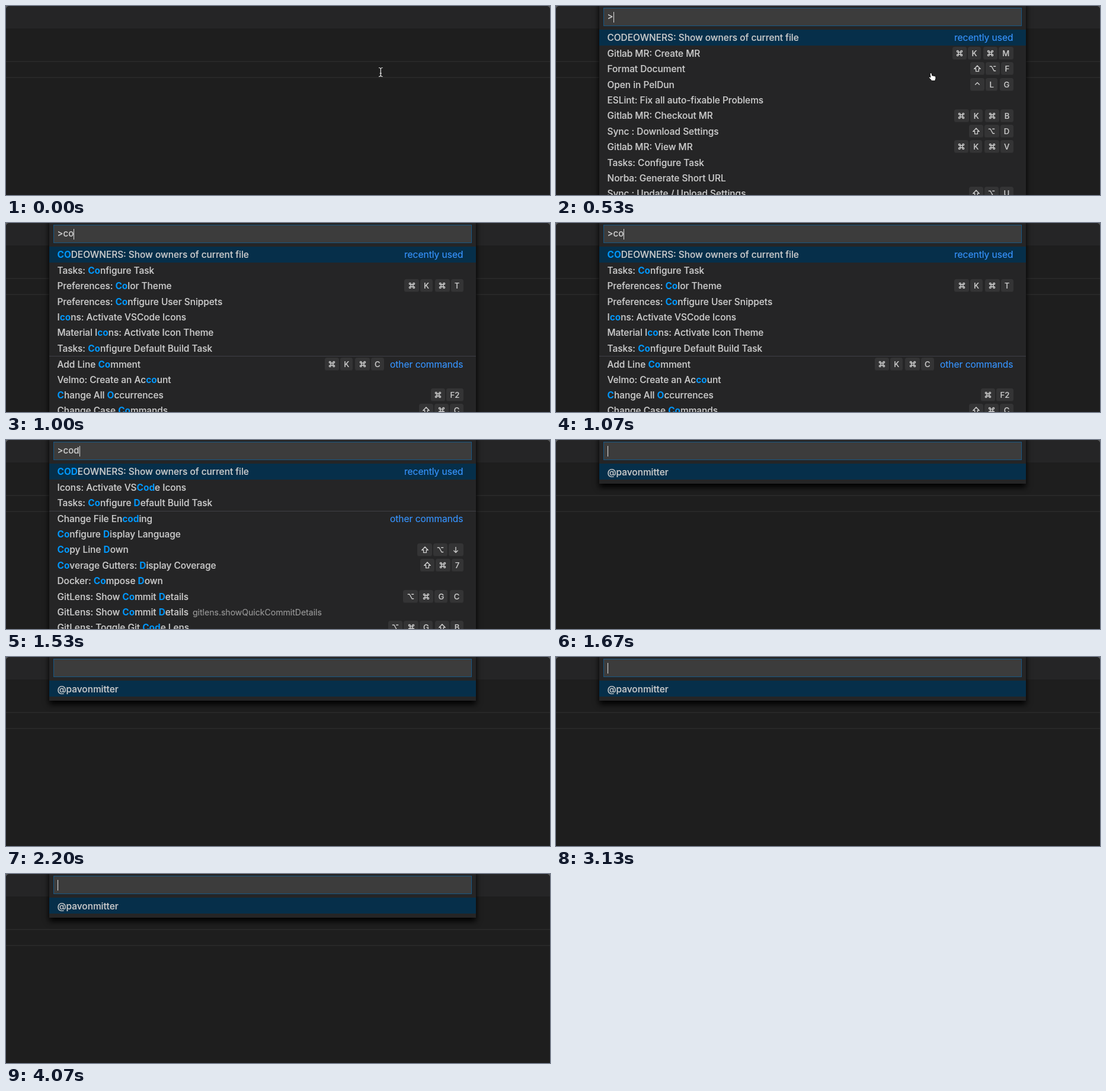
These frames come from a looping animation (918 by 320 pixels, 4140 ms). An HTML page:

```html
<!DOCTYPE html>
<html lang="en">
<head>
<meta charset="utf-8">
<title>Command palette</title>
<style>
  html, body { margin: 0; width: 100%; height: 100%; overflow: hidden; background: #5a5a5a; }
  #stage {
    position: relative; width: 918px; height: 320px; overflow: hidden;
    background: #1e1e1e; border-radius: 6px 6px 0 0;
    font: 500 15.4px/26.4px Inter, "Open Sans", sans-serif; color: #ccc;
    -webkit-text-stroke: .15px;
  }
  .bar { position: absolute; inset: 0 0 auto; height: 38px; background: #252526; }
  .line { position: absolute; left: 0; right: 0; height: 2px; background: #282828; }
  .panel {
    position: absolute; left: 73px; top: -10px; width: 720px; height: 350px;
    background: #252526; box-shadow: 0 6px 9.6px #000;
  }
  .panel.small { height: 84px; }
  .input {
    position: absolute; left: 7px; top: 13px; width: 706px; height: 31px; box-sizing: border-box;
    display: flex; align-items: center; padding-left: 5.5px; font-size: 15px;
    background: #3c3c3c; border: 1px solid #175885;
  }
  .caret { width: 1px; height: 18px; background: #e0e0e0; }
  .list { position: absolute; left: 0; right: 0; top: 50.4px; }
  .row {
    display: flex; align-items: center; height: 26.4px; box-sizing: border-box;
    padding: 0 21.5px 0 13.5px; white-space: pre;
  }
  .row:first-child { background: #062f4a; }
  .small .row { padding-top: 1px; }
  .row.split { padding-top: 1px; box-shadow: inset 0 1px #3f3f46; }
  .label, .desc, .group { position: relative; top: 1px; }
  .row b { color: #0097fb; font-weight: 700; -webkit-text-stroke: 0; }
  .desc { margin-left: 7px; font-size: 14.05px; font-weight: 400; color: #979797; }
  .keys { display: flex; gap: 2px; margin-left: auto; }
  .key {
    display: flex; align-items: center; height: 22px; padding: 0 6.2px;
    border-radius: 3.5px; background: #343435; box-shadow: inset 0 -1px #2c2c2d;
    font-size: 13.2px; line-height: 22px;
  }
  .chord { margin-left: 2px; }
  .key svg { width: 12px; height: 12px; fill: none; stroke: #ccc; stroke-width: 1.4; }
  .group { margin-left: 10px; font-size: 15.5px; font-weight: 400; color: #3794ff; }
  .mouse { position: absolute; left: 0; top: 0; }
</style>
</head>
<body>
<div id="stage">
  <div class="bar"></div>
  <div class="line" style="top:93px"></div>
  <div class="line" style="top:120px"></div>
</div>
<script>
const LOOP = 4140;
const stage = document.getElementById('stage');

const ICONS = {
  '⌘': 'M4.2 4.2V2.8A1.4 1.4 0 1 0 2.8 4.2H9.2A1.4 1.4 0 1 0 7.8 2.8V9.2A1.4 1.4 0 1 0 9.2 7.8H2.8A1.4 1.4 0 1 0 4.2 9.2Z',
  '⇧': 'M6 1 11 6.3H8.4V10.6H3.6V6.3H1Z',
  '⌥': 'M.8 2.2H4L8.2 9.8H11.2M7.2 2.2H11.2',
  '⌃': 'M2.2 6.5 6 2.8 9.8 6.5',
  '↓': 'M6 1V10.5M2.4 7 6 10.6 9.6 7'
};

// Row: label with *matches*, keys ("|" starts a chord), group, description
const LISTS = {
  all: [
    ['CODEOWNERS: Show owners of current file', '', 'recently used'],
    ['Gitlab MR: Create MR', '⌘ K|⌘ M'],
    ['Format Document', '⇧ ⌥ F'],
    ['Open in PelDun', '⌃ L|G'],
    ['ESLint: Fix all auto-fixable Problems'],
    ['Gitlab MR: Checkout MR', '⌘ K|⌘ B'],
    ['Sync : Download Settings', '⇧ ⌥ D'],
    ['Gitlab MR: View MR', '⌘ K|⌘ V'],
    ['Tasks: Configure Task'],
    ['Norba: Generate Short URL'],
    ['Sync : Update / Upload Settings', '⇧ ⌥ U']
  ],
  co: [
    ['*CO*DEOWNERS: Show owners of current file', '', 'recently used'],
    ['Tasks: *Co*nfigure Task'],
    ['Preferences: *Co*lor Theme', '⌘ K|⌘ T'],
    ['Preferences: *Co*nfigure User Snippets'],
    ['I*co*ns: Activate VSCode Icons'],
    ['Material I*co*ns: Activate Icon Theme'],
    ['Tasks: *Co*nfigure Default Build Task'],
    ['Add Line *Co*mment', '⌘ K|⌘ C', 'other commands'],
    ['Velmo: Create an Ac*co*unt'],
    ['*C*hange All *O*ccurrences', '⌘ F2'],
    ['Change Case *Co*mmands', '⇧ ⌘ C']
  ],
  cod: [
    ['*COD*EOWNERS: Show owners of current file', '', 'recently used'],
    ['Icons: Activate VS*Cod*e Icons'],
    ['Tasks: *Co*nfigure *D*efault Build Task'],
    ['Change File En*cod*ing', '', 'other commands'],
    ['*Co*nfigure *D*isplay Language'],
    ['*Co*py Line *D*own', '⇧ ⌥ ↓'],
    ['*Co*verage Gutters: *D*isplay Coverage', '⇧ ⌘ 7'],
    ['Docker: *Co*mpose *D*own'],
    ['GitLens: Show *Co*mmit *D*etails', '⌥ ⌘ G|C'],
    ['GitLens: Show *Co*mmit *D*etails', '', '', 'gitlens.showQuickCommitDetails'],
    ['GitLens: Toggle Git *Cod*e Lens', '⌥ ⌘ G|⇧ B']
  ],
  owner: [['@pavonmitter']]
};

const keyHtml = (key, chord) => `<span class="key${chord ? ' chord' : ''}">${
  ICONS[key] ? `<svg viewBox="0 0 12 12"><path d="${ICONS[key]}"/></svg>` : key}</span>`;

const keysHtml = keys => keys.split('|').map((part, p) =>
  part.split(' ').filter(Boolean).map((key, k) => keyHtml(key, p && !k)).join('')).join('');

function rowHtml([label, keys = '', group = '', desc = ''], i) {
  const text = label.replace(/\*(.+?)\*/g, '<b>$1</b>');
  return `<div class="row${group && i ? ' split' : ''}"><span class="label">${text}</span>` +
    (desc && `<span class="desc">${desc}</span>`) +
    `<span class="keys">${keysHtml(keys)}</span>` +
    (group && `<span class="group">${group}</span>`) + '</div>';
}

function addPanel(name) {
  const el = document.createElement('div');
  el.className = name === 'owner' ? 'panel small' : 'panel';
  el.innerHTML = '<div class="input"><span class="typed"></span><i class="caret"></i></div>' +
    `<div class="list">${LISTS[name].map(rowHtml).join('')}</div>`;
  stage.append(el);
  return { el, typed: el.querySelector('.typed'), caret: el.querySelector('.caret') };
}

const panels = {};
for (const name in LISTS) panels[name] = addPanel(name);

stage.insertAdjacentHTML('beforeend', `
<svg class="mouse" width="918" height="320">
  <path id="beam" fill="none" stroke="#eee" stroke-width="1.2"
    d="M629 104.5Q632 104.5 632.3 106.5Q632.6 104.5 635.6 104.5M632.3 106V118M629 119.5Q632 119.5 632.3 117.5Q632.6 119.5 635.6 119.5M630.6 114H634"/>
  <path id="hand" transform="translate(628.5 112.5)" fill="#fff" stroke="#000" stroke-width=".9"
    d="M3.6 1.2c1-.6 1.8 0 2 1l.7 3.4c.8-.6 1.6-.3 2 .3 .9-.5 1.6-.2 2 .5 1-.4 1.7.1 1.9 1 .4 1.8.3 3.4-.7 4.8v2H5.4L4 12.2 1 9.2c-.9-1 .3-2.3 1.5-1.5l1 .9L2.6 2.6c-.2-.7.3-1.2 1-1.4z"/>
</svg>`);
const mice = { beam: document.getElementById('beam'), hand: document.getElementById('hand') };

const STEPS = [
  { at: 0, mouse: 'beam' },
  { at: 530, panel: 'all', text: '>', mouse: 'hand' },
  { at: 870, panel: 'all', text: '>c' },
  { at: 1000, panel: 'co', text: '>co' },
  { at: 1130, panel: 'cod', text: '>cod' },
  { at: 1600 },
  { at: 1670, panel: 'owner', text: '' }
];

const show = (el, on) => { el.style.visibility = on ? 'visible' : 'hidden'; };

function draw(t) {
  const step = STEPS.findLast(s => s.at <= t);
  for (const name in panels) show(panels[name].el, name === step.panel);
  for (const name in mice) show(mice[name], name === step.mouse);
  const panel = panels[step.panel];
  if (!panel) return;
  panel.typed.textContent = step.text;
  // The caret blinks every 500 ms, starting again with each key
  panel.caret.style.opacity = Math.floor((t - step.at) / 500) % 2 ? 0 : 1;
}

let start;
function tick(now) {
  start ??= now;
  draw((now - start) % LOOP);
  requestAnimationFrame(tick);
}
draw(0);
requestAnimationFrame(tick);
</script>
</body>
</html>
```
